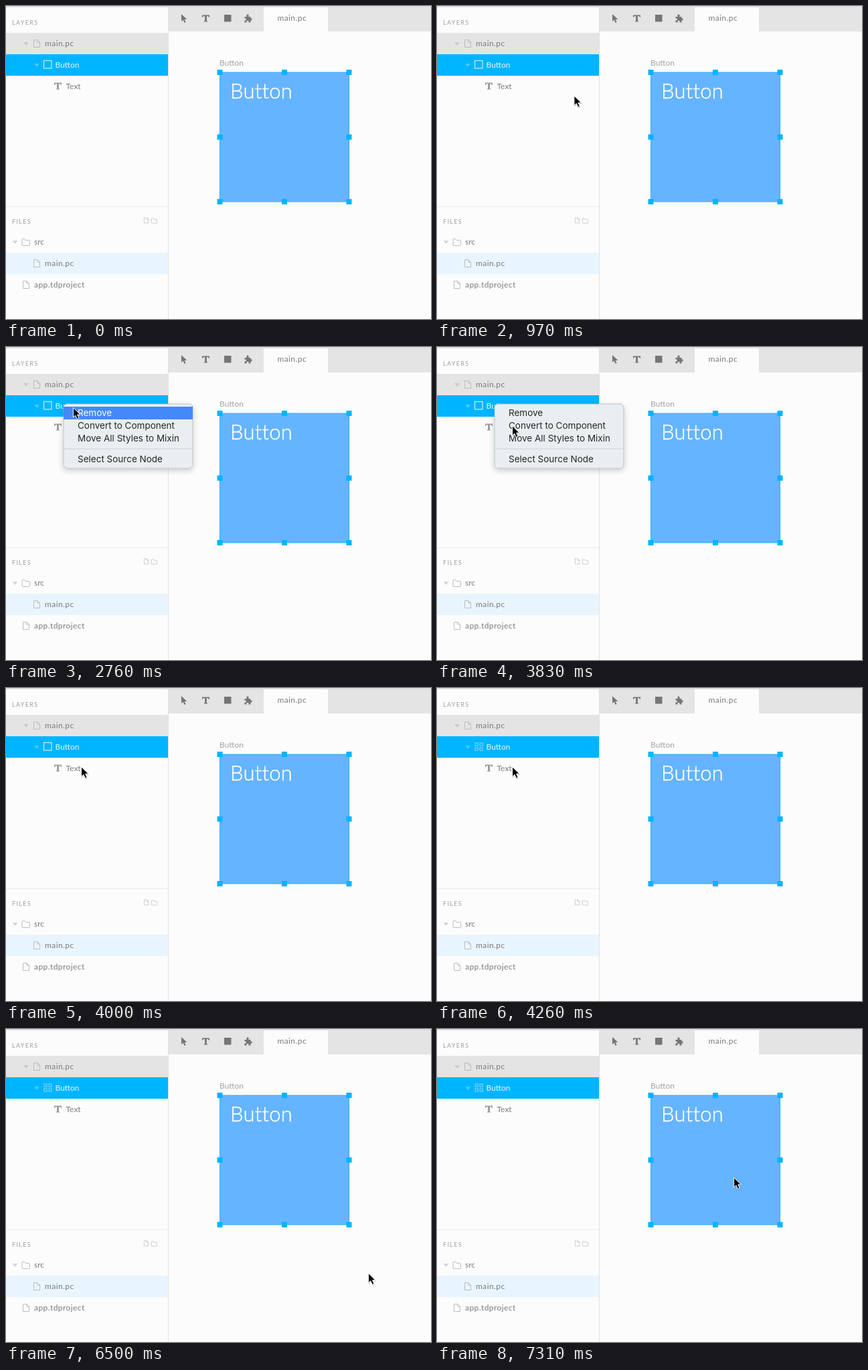
Animation, 635 px wide and 467 px high, one loop 8000 ms. Source, as an HTML page:

```html
<!DOCTYPE html>
<html lang="en">
<head>
<meta charset="utf-8">
<title>Convert to Component</title>
<style>
html, body { margin: 0; width: 100%; height: 100%; overflow: hidden; background: #fcfcfc; }
svg { display: block; width: 100vw; height: 100vh; }
text { font: 12px Lato, sans-serif; fill: #7b7b7b; white-space: pre; }
.file { letter-spacing: .42px; }
.head { font-size: 9px; letter-spacing: 1.35px; fill: #a0a0a0; }
.label { fill: #a3a3a3; }
.title { font-size: 31px; font-weight: 300; letter-spacing: .2px; fill: #fff; stroke: #fff; stroke-width: .45px; }
.row { fill: #e8f8ff; }
#menu text { font: 13.5px Inter, "Liberation Sans", sans-serif; fill: #262626; }
#menu text.on { fill: #fff; }
.line { fill: none; stroke: #bdbdbd; }
#box { fill: none; stroke: #c4ecff; stroke-width: 1.3; }
#grid { fill: none; stroke: #8adaff; }
</style>
</head>
<body>
<svg viewBox="0 0 635 467" preserveAspectRatio="none">
  <defs>
    <path id="caret" d="M0 0H8L4 5Z"/>
    <path id="page" d="M.5 .5H6L9.5 4V11.5H.5ZM6 .5V4H9.5"/>
    <path id="folder" d="M.5 1.5Q.5 .5 1.5 .5H4.5L6 2.5H11Q12 2.5 12 3.5V9.5Q12 10.5 11 10.5H1.5Q.5 10.5 .5 9.5Z"/>
    <path id="tee" d="M0 0H11V3.2H10Q9.7 1.4 8.2 1.4H6.9V8.4Q6.9 9.1 8.3 9.2V10H2.7V9.2Q4.1 9.1 4.1 8.4V1.4H2.8Q1.3 1.4 1 3.2H0Z"/>
    <filter id="shadow" x="-20%" y="-20%" width="140%" height="150%">
      <feDropShadow dx="0" dy="3" stdDeviation="4" flood-opacity=".2"/>
    </filter>
    <filter id="soft" x="-30%" y="-30%" width="170%" height="170%">
      <feDropShadow dx=".4" dy="1" stdDeviation=".7" flood-opacity=".3"/>
    </filter>
  </defs>

  <rect width="635" height="467" fill="#fcfcfc"/>

  <!-- toolbar -->
  <rect x="243" width="392" height="38" fill="#e4e4e4"/>
  <rect x="385" width="96" height="38" fill="#fcfcfc"/>
  <rect width="635" height="2" fill="#dedede"/>
  <g fill="#757575">
    <path d="M262 12V23L264.6 20.6L266.6 25L268.6 24.1L266.6 19.9H270.4Z"/>
    <use href="#tee" x="293" y="13.5"/>
    <rect x="326" y="13" width="10.5" height="10.5"/>
    <path d="M356.5 16H359.8Q358.4 12.5 361 12.5Q363.6 12.5 362.2 16H365.5V18.6Q367.6 17.6 367.6 20Q367.6 22.2 365.5 21.2V24.5H362.4Q363.2 21.8 361 21.8Q358.8 21.8 359.6 24.5H356.5V21.2Q359 22 359 20Q359 18 356.5 18.8Z"/>
  </g>
  <text class="file" x="405.4" y="22">main.pc</text>

  <!-- layers -->
  <rect y="40" width="242" height="32" fill="#e4e4e4"/>
  <rect y="72" width="242" height="32" fill="#00b5ff"/>
  <text class="head" x="9" y="28">LAYERS</text>
  <use href="#caret" x="26" y="54" fill="#cacaca"/>
  <use href="#page" class="line" x="41" y="50"/>
  <text class="file" x="58" y="60">main.pc</text>
  <use href="#caret" x="42" y="86" fill="#48c8ff"/>
  <rect id="box" x="56.5" y="81.5" width="11.5" height="11.5"/>
  <g id="grid"></g>
  <text class="row" x="73.5" y="92">Button</text>
  <use href="#tee" x="72" y="114.5" fill="#999"/>
  <text x="89.5" y="124">Text</text>

  <!-- files -->
  <rect y="299" width="242" height="1" fill="#ececec"/>
  <text class="head" x="9" y="325">FILES</text>
  <use href="#page" class="line" transform="translate(206 315.5) scale(.72)"/>
  <use href="#folder" class="line" transform="translate(217 316.5) scale(.72)"/>
  <rect y="368" width="242" height="32" fill="#e9f5fe"/>
  <use href="#caret" x="9.5" y="350" fill="#d6d6d6"/>
  <use href="#folder" class="line" x="23.5" y="347"/>
  <text x="42" y="356">src</text>
  <use href="#page" class="line" x="41" y="378"/>
  <text class="file" x="58" y="388">main.pc</text>
  <use href="#page" class="line" x="25" y="410"/>
  <text class="file" x="42" y="420">app.tdproject</text>
  <rect x="242" y="2" width="1" height="465" fill="#e2e2e2"/>

  <!-- artboard -->
  <rect x="319.5" y="99" width="193" height="193" fill="#65b4ff"/>
  <text class="title" x="335" y="138">Button</text>
  <g id="overlay">
    <text class="label" x="319" y="89">Button</text>
    <rect x="319.5" y="99" width="193" height="193" fill="none" stroke="#2eadfb"/>
    <g id="handles" fill="#00b5ff"></g>
  </g>

  <g id="menu">
    <rect x="86" y="85" width="193" height="96" rx="5.5" fill="#e9eef1" stroke="#b2b6b8" stroke-width=".8" filter="url(#shadow)"/>
    <rect id="pick" x="86" width="193" height="19" fill="#4489f8"/>
    <rect x="86" y="151.5" width="193" height="1.2" fill="#d2d7da"/>
    <text x="107" y="103">Remove</text>
    <text x="107" y="122">Convert to Component</text>
    <text x="107" y="141">Move All Styles to Mixin</text>
    <text x="107" y="172">Select Source Node</text>
  </g>

  <path id="cursor" d="M.6 .6V15.2L3.9 12.1L6.4 17.6L9.1 16.4L6.7 11.1H11.3Z" stroke="#fff" filter="url(#soft)"/>
</svg>

<script>
const LOOP = 8000, STEP = 90;
const ENTER = 180, OPEN = 2310, BLINK = 3830, CLOSE = 4000, CONVERT = 4170;
const ITEM_TOP = 89, ITEM_HEIGHT = 19;
const $ = id => document.getElementById(id);

function addSquare(parent, x, y, size) {
  const r = document.createElementNS('http://www.w3.org/2000/svg', 'rect');
  for (const [k, v] of Object.entries({ x, y, width: size, height: size })) r.setAttribute(k, v);
  parent.append(r);
}

// Eight handles around the artboard, four cells in the component icon.
for (let i = 0; i < 9; i++) {
  if (i !== 4) addSquare($('handles'), 315.5 + 96.5 * (i % 3), 95 + 96.5 * Math.floor(i / 3), 8);
}
for (let i = 0; i < 4; i++) addSquare($('grid'), 57 + 7 * (i % 2), 82 + 7 * (i >> 1), 4.2);

const smooth = u => u * u * (3 - 2 * u);
const easeOut = u => Math.sin(u * Math.PI / 2);

// Each move curves from the previous end point past `via` to `to`.
const origin = [450, 235];
const moves = [
  { start: ENTER, end: 440, via: [620, 345], to: [553, 397] },
  { start: 710, end: 1060, to: [122, 71], ease: easeOut },
  { start: 1500, end: 1950, to: [83, 88] },
  { start: 2760, end: 3110, via: [116, 86], to: [112, 117], ease: easeOut },
  { start: 4890, end: 5160, to: [499, 245] },
  { start: 5340, end: 5610, via: [484, 323], to: [553, 380] },
  { start: 5880, end: 5880, to: [553, 382] },
  { start: 6500, end: 6860, to: [436, 206] },
  { start: 7220, end: 7310, to: [443, 221] }
];

// Progress in hard steps, as a screen capture shows it.
function stepped(t, start, end) {
  if (t >= end) return 1;
  const gaps = Math.round((end - start) / STEP);
  return (Math.floor((t - start) / (end - start) * gaps) + 1) / (gaps + 1);
}

function pointerAt(t) {
  let at = origin;
  for (const { start, end, via, to, ease = smooth } of moves) {
    if (t < start) break;
    const s = ease(stepped(t, start, end)), from = at;
    at = to.map((b, i) => {
      const a = from[i], c = via ? via[i] : (a + b) / 2;
      return (1 - s) ** 2 * a + 2 * s * (1 - s) * c + s * s * b;
    });
  }
  return at;
}

const show = (id, on) => { $(id).style.display = on ? '' : 'none'; };
const within = (t, from, to) => t >= from && t < to;

function draw(t) {
  const [x, y] = pointerAt(t);
  show('cursor', t >= ENTER);
  $('cursor').setAttribute('transform', `translate(${x} ${y})`);

  const blink = within(t, BLINK, BLINK + STEP);
  const item = blink ? -1 : Math.floor((y - ITEM_TOP) / ITEM_HEIGHT);
  show('menu', within(t, OPEN, CLOSE));
  show('pick', item >= 0);
  $('pick').setAttribute('y', ITEM_TOP + ITEM_HEIGHT * item);
  $('menu').querySelectorAll('text').forEach((el, i) => el.classList.toggle('on', i === item));

  show('box', t < CONVERT);
  show('grid', t >= CONVERT);
  show('overlay', !within(t, CONVERT, CONVERT + STEP));
}

const begin = performance.now();
function tick() {
  draw((performance.now() - begin) % LOOP);
  requestAnimationFrame(tick);
}
tick();
</script>
</body>
</html>
```
